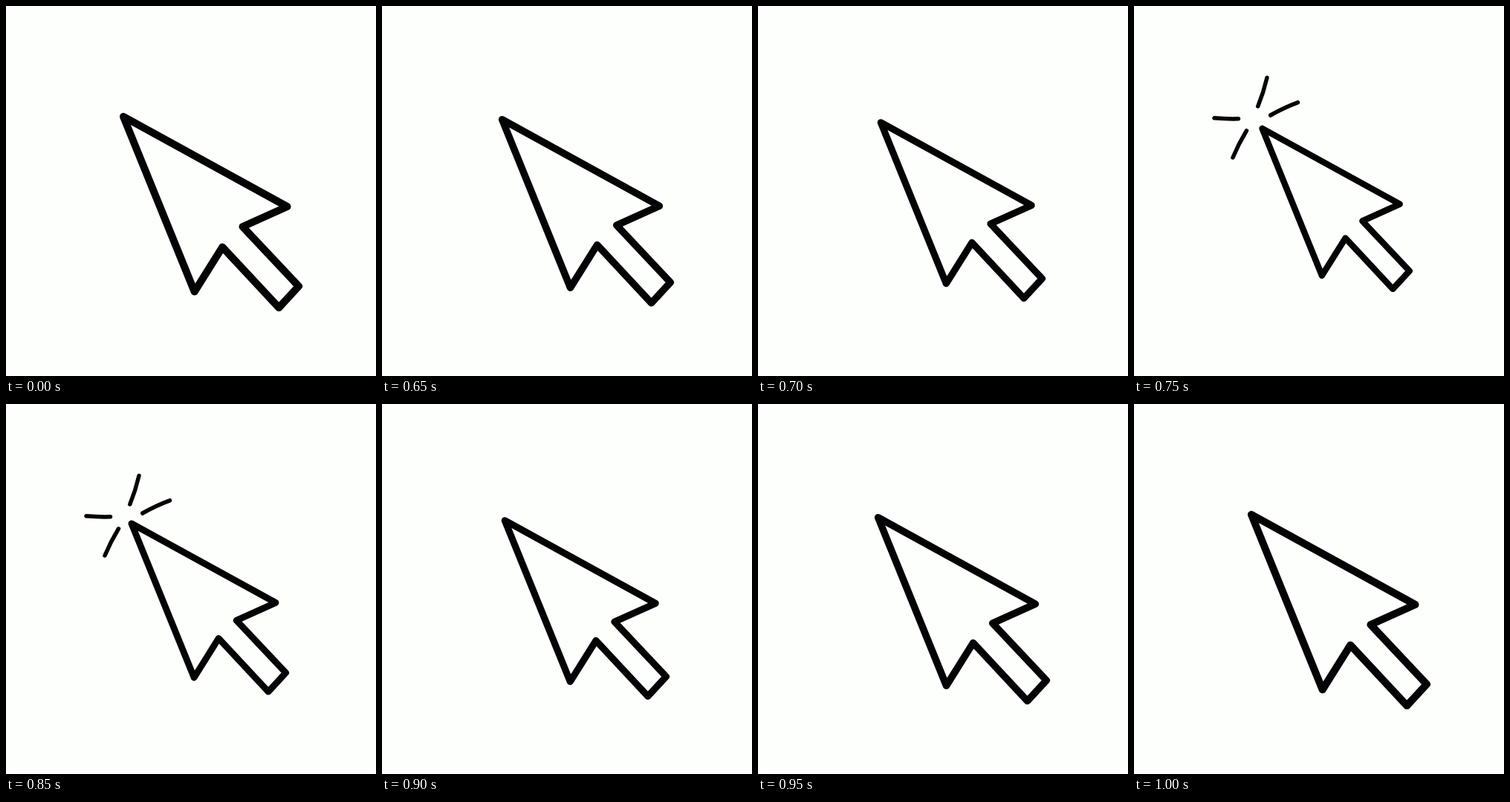
Animation, 498 px wide and 498 px high, one loop 1950 ms. Source, as an HTML page:

```html
<!DOCTYPE html>
<html lang="en">
<head>
<meta charset="utf-8">
<title>Cursor click</title>
<style>
  html, body { margin: 0; width: 100%; height: 100%; overflow: hidden; background: #fdfffc; }
  svg { display: block; width: 100%; height: 100%; }
  path { fill: none; stroke: #040305; stroke-linecap: round; stroke-linejoin: round; }
</style>
</head>
<body>
<svg viewBox="0 0 498 498">
  <path id="arrow" stroke-width="10"
    d="M158 148.8 L378.5 270 L318.5 297 L394 377.2 L367.3 406 L291.3 324.5 L253.7 384.5 Z"/>
  <path id="rays" stroke-width="5.5"
    d="M179 96.5 Q174.5 116 166.8 135 M220.5 129.8 Q201 137 183.8 147
       M108 150.8 Q124 152.2 140.5 151.8 M151.5 167.8 Q141 185 133 204"/>
</svg>
<script>
  const LOOP = 1950, STEP = 50, START = 600, CENTER = 249;
  const arrow = document.getElementById('arrow');
  const rays = document.getElementById('rays');

  // Press depth per step: a fast push, then an even release.
  const press = [0, 1, 2, 4, 5, 3, 2, 1, 0];

  function draw(ms) {
    const step = Math.floor((ms % LOOP - START) / STEP);
    const depth = press[step] || 0;
    const scale = 1 - 0.04 * depth;
    arrow.setAttribute('transform',
      `translate(${CENTER} ${CENTER}) scale(${scale}) translate(${-CENTER} ${-CENTER})`);
    rays.setAttribute('visibility', depth > 2 ? 'visible' : 'hidden');
  }

  let start;
  function tick(now) {
    start ??= now;
    draw(now - start);
    requestAnimationFrame(tick);
  }
  draw(0);
  requestAnimationFrame(tick);
</script>
</body>
</html>
```
